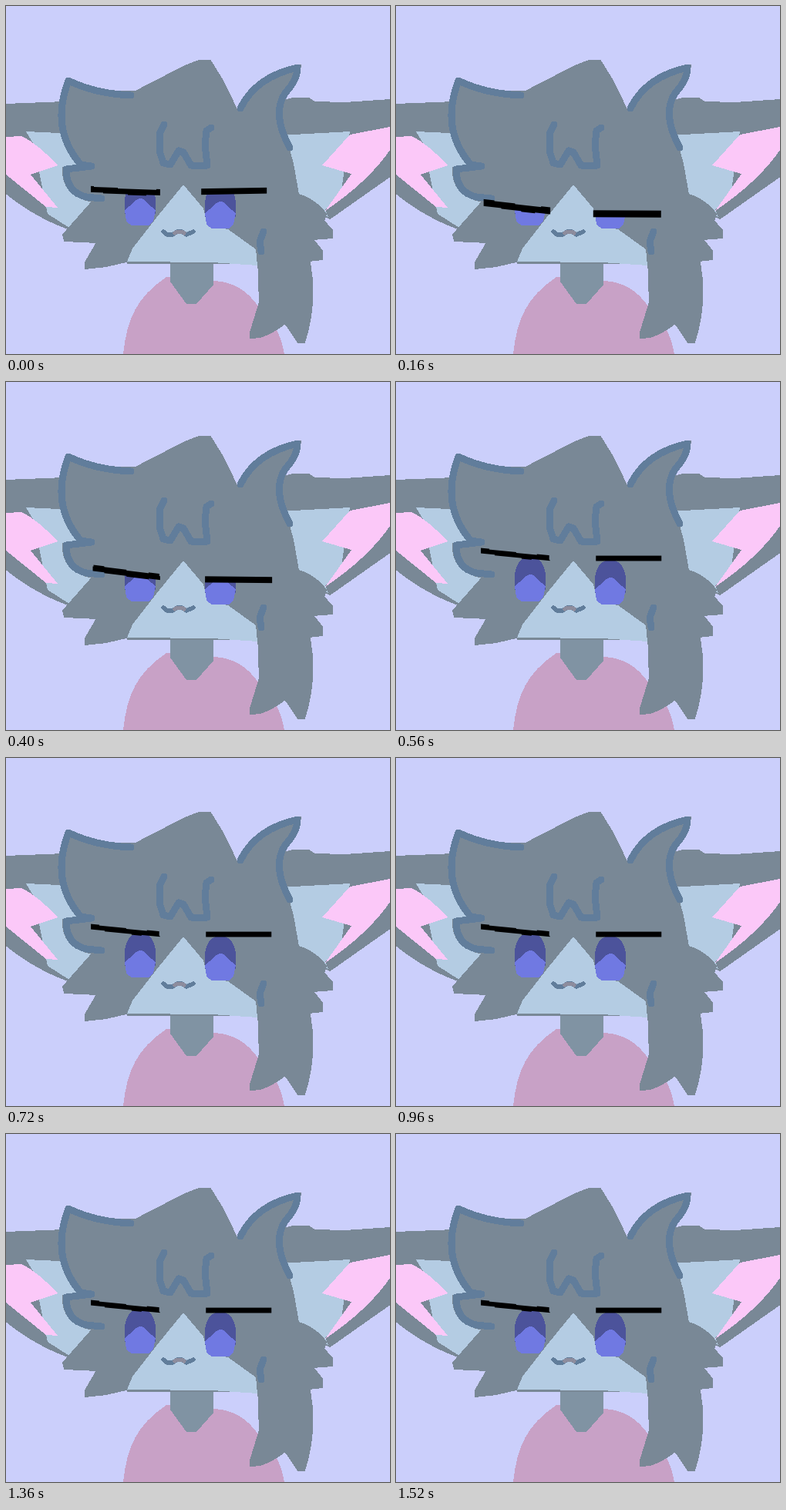
Recreate the animation shown at these times as an HTML page. Size 498 by 452 pixels, loop 1600 ms.

```html
<!DOCTYPE html>
<html lang="en">
<head>
<meta charset="utf-8">
<title>Blinking cat</title>
<style>
  html, body { margin: 0; width: 100%; height: 100%; overflow: hidden; background: #cbcffb; }
  svg { display: block; width: 498px; height: 452px; shape-rendering: crispEdges; }

  .fur { fill: #798896; stroke: #798896; stroke-width: 2; }
  .pale { fill: #b4cce3; }
  .pink { fill: #fbc8f8; }
  .shirt { fill: #c8a1c6; }
  .neck { fill: #8093a3; }
  .iris { fill: #4c539b; }
  .glow { fill: #7079e2; }
  .line { fill: none; stroke: #617d9b; stroke-width: 9; stroke-linecap: round; stroke-linejoin: round; }
  .mouth { stroke-width: 5.5; }
  .lip { stroke: #8d8c9d; stroke-width: 5; }
  .lid { fill: none; stroke: #000; stroke-width: 8; }

  /* Each lid and its eye mask share one motion: three steps down, four up, then rest. */
  .left, .right { transform-origin: 0 0; animation: 1.6s infinite; }
  .left { animation-name: left; }
  .right { animation-name: right; }

  @keyframes left {
    0%  { transform: translate(110px, 239px) skewY(2deg) scale(1, .95); animation-timing-function: steps(3); }
    15% { transform: translate(116px, 265px) skewY(8.5deg) scale(.93, 1.15); animation-timing-function: steps(4); }
    35%, 100% { transform: translate(110px, 220px) skewY(5.5deg) scale(.99, .85); }
  }
  @keyframes right {
    0%  { transform: translate(253px, 241px) skewY(-1deg) scale(.95, .95); animation-timing-function: steps(3); }
    15% { transform: translate(257px, 284px) skewY(1deg) scale(.99, 1.2); animation-timing-function: steps(4); }
    35%, 100% { transform: translate(259px, 229px) skewY(0deg) scale(.95, .85); }
  }
</style>
</head>
<body>
<svg viewBox="0 0 498 452">
  <defs>
    <clipPath id="openLeft"><path class="left" d="M-5 0H95V100H-5z"/></clipPath>
    <clipPath id="openRight"><path class="right" d="M-5 0H95V100H-5z"/></clipPath>
    <g id="eye">
      <path class="iris" d="M-20 14V-5C-19-20-11-29 0-29S19-20 20-5V14z"/>
      <path class="glow" d="M-20 9L-9 0Q0-12 9 0L20 9L17 24L11 29H-11L-18 24z"/>
    </g>
  </defs>

  <g id="ears">
    <path class="fur" d="M0 128L76 125L112 254L83 290Q38 274 0 243z"/>
    <path class="pale" d="M26 163L112 167V255L82 288L54 270L36 180z"/>
    <path class="pink" d="M0 170L20 169Q40 178 67 207L32 219L67 262L52 261L0 219z"/>
    <path class="fur" d="M350 126L372 120H393L400 125L440 126L498 122V221L420 276L375 250z"/>
    <path class="pale" d="M355 168L446 163L435 240L414 265L418 274L370 248z"/>
    <path class="pink" d="M446 167L498 157V187Q470 228 414 266L448 218L410 207Z"/>
  </g>

  <path class="shirt" d="M152 452C157 405 170 378 208 352L269 357Q305 358 327 390Q355 415 361 452z"/>
  <path class="neck" d="M213 328H269V362L247 387H234L213 358z"/>

  <g id="head" class="fur">
    <path d="M80 94Q115 113 168 111L232 78L250 71H265L281 97L300 136H360V160L372 205L380 250L327 334H158L112 254Q72 246 74 210L97 208Q56 160 80 94z"/>
    <path d="M112 254L74 297L76 305L118 307L103 333V341L130 338L160 331L200 260z"/>
    <path d="M300 136Q320 86 382 77Q380 95 366 112Q356 130 361 160z"/>
    <path d="M376 244Q400 250 415 270L412 279L423 291V301L398 303L410 318V329L392 331L330 330z"/>
    <path d="M327 325L329 385L317 424V431L330 430Q347 424 362 412L379 437H387Q405 380 392 325z"/>
  </g>
  <path class="pale" d="M230 232L256 263L262 285L288 290L324 316L326 337L268 333L157 332L164 315L195 275z"/>

  <g class="line">
    <path d="M162 116Q116 114 81 97Q57 160 97 206L111 208L78 212Q78 242 104 248L124 250"/>
    <path d="M304 133Q324 92 378 80Q378 96 362 113Q344 140 368 184"/>
    <path d="M205 154L199 166V188L204 204L213 206L224 188L230 190L240 207H261L258 180L260 162L266 158"/>
    <path d="M334 293L329 306L331 319"/>
    <path class="mouth" d="M204 293L209 297H216L222 293H228L234 297L243 293"/>
    <path class="lip" d="M219 295L222 293H228L231 295"/>
  </g>

  <g clip-path="url(#openLeft)"><use href="#eye" x="174" y="256"/></g>
  <g clip-path="url(#openRight)"><use href="#eye" x="278" y="260"/></g>
  <path class="lid left" d="M0-1L30 0L60 1L90 0"/>
  <path class="lid right" d="M0 0H90"/>
</svg>
</body>
</html>
```
